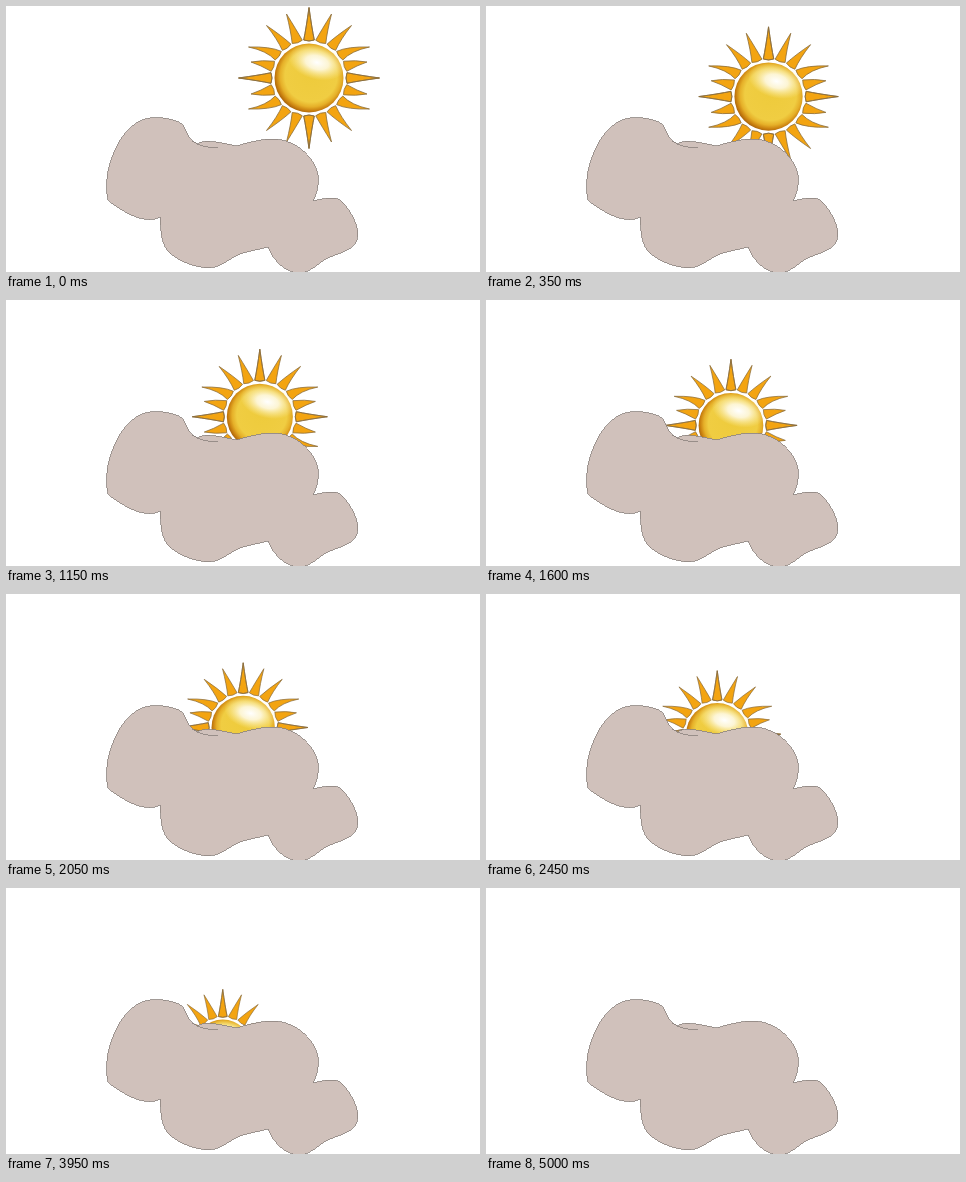
An HTML page for the animation above (5.05 s loop, 474x266 px).

```html
<!DOCTYPE html>
<html lang="en">
<head>
<meta charset="utf-8">
<title>Sun setting behind a cloud</title>
<style>
  html, body { margin: 0; width: 100%; height: 100%; overflow: hidden; background: #fff; }
  svg { display: block; width: 100%; height: 100%; }
</style>
</head>
<body>
<svg viewBox="0 0 474 266">
  <defs>
    <radialGradient id="disk" cx=".53" cy=".47" r=".54">
      <stop offset="0" stop-color="#eecb3c"/>
      <stop offset=".7" stop-color="#f0cd42"/>
      <stop offset=".83" stop-color="#e6b029"/>
      <stop offset=".93" stop-color="#cb8210"/>
      <stop offset="1" stop-color="#a9640c"/>
    </radialGradient>
    <radialGradient id="shine">
      <stop offset="0" stop-color="#fff"/>
      <stop offset=".4" stop-color="#fffcee" stop-opacity=".85"/>
      <stop offset="1" stop-color="#fff3b0" stop-opacity="0"/>
    </radialGradient>
  </defs>
  <g id="sun">
    <path id="rays" fill="#f3a411" stroke="#8a6c3c" stroke-width=".8" stroke-linejoin="round"/>
    <circle r="34.5" fill="url(#disk)"/>
    <ellipse cx="4" cy="-17" rx="29" ry="17" transform="rotate(14)" fill="url(#shine)"/>
  </g>
  <g stroke="#8b827e" stroke-width=".8" shape-rendering="crispEdges">
    <path fill="#d0c1bb" d="M149 111.5C159 111.5 171 114 176 118C181 123 181 134 192 138
      C196 133 214 136 230 140C245 136 255 133 267 133C290 133 312 153 312.5 174
      Q312 186 307 195C315 193 327 190 334 194C341 199 352 217 352 228
      C352 244 335 246 322 252C313 256 306 266 294 267C279 267 267 254 262 241
      C252 244 239 245 230 250C222 254 213 262 202 262C187 261 169 254 161 244
      C154 234 155 221 154 211C146 216 133 213 123 208Q108 200 102 194
      C99 183 101 164 105 154C111 136 124 112 149 111.5Z"/>
    <path fill="none" d="M186 135Q196 142 212 142"/>
  </g>
</svg>
<script>
  const LOOP = 5050, STEP = 50, SLOWDOWN = 650, GONE = 4950;
  const lerp = (a, b, f) => a + (b - a) * f;
  const easeOut = (u, power) => 1 - (1 - u) ** power;

  // A spike that stands on the disk at `angle` and may lean towards its tip
  function ray(angle, tipX, tipY) {
    const sin = Math.sin(angle), cos = Math.cos(angle);
    const at = (r, w) => `${r * sin + w * cos} ${w * sin - r * cos}`;
    return `M${at(38, -5.3)}Q${at(50, -2.8)} ${tipX} ${tipY}` +
      `Q${at(50, 2.8)} ${at(38, 5.3)}Q${at(36, 0)} ${at(38, -5.3)}Z`;
  }

  // Ray tips from the top round to the right, mirrored into all four quadrants
  const tips = [[0, 70.5], [22.5, 64], [42.5, 52.5], [60.5, 31], [58, 16], [70.5, 0]];
  const mirrors = [[1, 1], [1, -1], [-1, 1], [-1, -1]];
  const outline = mirrors.flatMap(([mx, my]) => tips.map(([x, y], i) => {
    const a = i * Math.PI / 10;
    return ray(Math.atan2(mx * Math.sin(a), my * Math.cos(a)), mx * x, -my * y);
  }));
  document.getElementById('rays').setAttribute('d', outline.join(''));

  // A quick straight drop to the cloud, then a slow sinking that eases out
  function pose(t) {
    if (t < SLOWDOWN) {
      const f = t / SLOWDOWN;
      return [lerp(303, 265, f), lerp(72, 106.5, f), lerp(1, .98, f)];
    }
    const u = Math.min(1, (t - SLOWDOWN) / (GONE - SLOWDOWN));
    return [lerp(265, 214, easeOut(u, 2)), lerp(106.5, 167, easeOut(u, 1.5)), lerp(.98, .79, u)];
  }

  const sun = document.getElementById('sun');

  function draw() {
    const t = Math.floor(performance.now() % LOOP / STEP) * STEP;
    const [x, y, scale] = pose(t);
    sun.setAttribute('transform', `translate(${x} ${y}) scale(${scale})`);
    sun.setAttribute('visibility', t < GONE ? 'visible' : 'hidden');
    requestAnimationFrame(draw);
  }
  draw();
</script>
</body>
</html>
```
